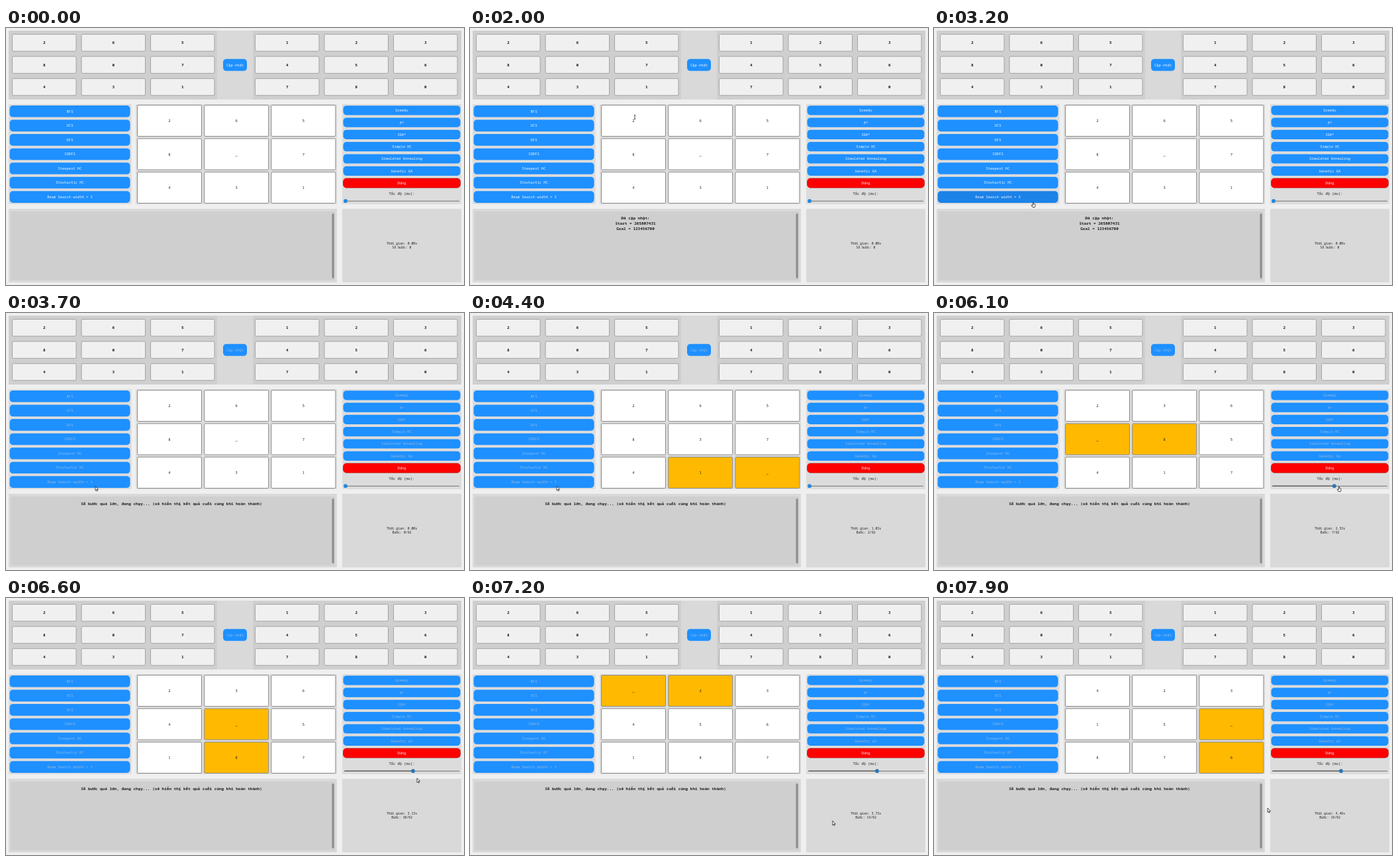
An HTML page with a canvas that plays this animation: 692 by 388 pixels, repeating every 8000 ms.

```html
<!DOCTYPE html>
<html lang="vi">
<head>
<meta charset="utf-8">
<title>8-puzzle</title>
<style>
  html, body { margin: 0; width: 100%; height: 100%; overflow: hidden; background: #efefef; }
  canvas { display: block; }
</style>
</head>
<body>
<canvas id="stage" width="692" height="388"></canvas>
<script>
const ctx = document.getElementById('stage').getContext('2d');
const LOOP = 8000, UPDATED = 1400, RUN = 3500;
const BLUE = '#1e90ff', HOVER = '#1b82e8', AMBER = '#ffb900', INK = '#1c1c1c';

// Search result: each letter moves the blank one cell.
const MOVES = 'DRUULDLDRURULLDDRRU';
const STEP_TIMES = [4100, 4400, 4900, 5200, 5500, 5750, 6000, 6200, 6400, 6600,
  6800, 6900, 7000, 7100, 7300, 7400, 7600, 7700, 7900];
const FIRST_ELAPSED = [0, .52, 1.03, 1.45, 1.75, 2.01, 2.28, 2.53, 2.75, 2.95];
const OFFSET = { U: -3, D: 3, L: -1, R: 1 };

const states = [{ tiles: [...'2658_7431'], lit: [] }];
for (const move of MOVES) {
  const tiles = [...states[states.length - 1].tiles];
  const from = tiles.indexOf('_'), to = from + OFFSET[move];
  [tiles[from], tiles[to]] = [tiles[to], tiles[from]];
  states.push({ tiles, lit: [from, to] });
}

const stepAt = t => STEP_TIMES.filter(at => at <= t).length;
const elapsed = n => n < 10 ? FIRST_ELAPSED[n] : 3.13 + .15 * (n - 10);

// Keys are [time, value, ...]; linear in between.
function track(keys, t) {
  if (t <= keys[0][0]) return keys[0].slice(1);
  const i = keys.findIndex(k => k[0] > t);
  if (i < 0) return keys[keys.length - 1].slice(1);
  const a = keys[i - 1], b = keys[i], f = (t - a[0]) / (b[0] - a[0]);
  return a.slice(1).map((v, j) => v + (b[j + 1] - v) * f);
}
const POINTER = [[900, 602, 152], [1300, 346, 54], [1800, 346, 54], [2000, 249, 134.5],
  [2600, 150, 226], [3000, 150, 259], [3200, 150, 263], [3500, 143, 262], [3800, 131, 261.5],
  [4400, 131, 261.5], [4900, 514, 262], [5100, 514, 262], [5700, 572, 262], [6200, 622, 262],
  [6400, 622, 266], [6600, 621, 272], [6900, 612, 292], [7400, 505, 366], [7800, 505, 366],
  [7900, 504, 317]];
const KNOB = [[5100, 513], [5700, 564], [6200, 615]];

const grid = (x, y, dx, dy, w, h) => Array.from({ length: 9 }, (_, i) =>
  ({ x: x + i % 3 * dx, y: y + Math.floor(i / 3) * dy, w, h }));
const startCells = grid(9.5, 9.5, 104.5, 33.4, 96.5, 25.5);
const goalCells = grid(376.5, 9.5, 104.5, 33.4, 96.5, 25.5);
const boardCells = grid(198.5, 116.5, 101.2, 50.5, 97, 47);
const column = (labels, x, y, w, h, pitch) =>
  labels.map((label, i) => ({ label, x, y: y + i * pitch, w, h }));
const buttons = [
  { label: 'Cập nhật', x: 328, y: 46.8, w: 36, h: 18 },
  ...column(['BFS', 'UCS', 'DFS', 'IDDFS', 'Steepest HC', 'Stochastic HC',
    'Beam Search width = 3'], 5.5, 117, 182, 17.6, 21.55),
  ...column(['Greedy', 'A*', 'IDA*', 'Simple HC', 'Simulated Annealing',
    'Genetic GA', 'Dừng'], 509.5, 117.2, 177, 14.2, 18.3),
];
const slider = { x: 510, y: 258, w: 176, h: 7 };

const inside = (r, [x, y]) => x >= r.x && x <= r.x + r.w && y >= r.y && y <= r.y + r.h;

function box(x, y, w, h, r, fill, stroke, width = 1) {
  ctx.beginPath();
  ctx.roundRect(x, y, w, h, r);
  ctx.fillStyle = fill;
  ctx.fill();
  if (stroke) {
    ctx.strokeStyle = stroke;
    ctx.lineWidth = width;
    ctx.stroke();
  }
}

// Set large and scaled down so that small sizes keep fractional advances.
function text(str, x, y, size, color = INK, weight = 400) {
  ctx.save();
  ctx.translate(x, y);
  ctx.scale(.1, .1);
  ctx.font = `${weight} ${size * 10}px "Noto Sans Mono", "DejaVu Sans Mono", monospace`;
  ctx.textAlign = 'center';
  ctx.textBaseline = 'alphabetic';
  ctx.fillStyle = color;
  ctx.fillText(str, 0, size * 3.5);
  ctx.restore();
}

function panels() {
  ctx.fillStyle = '#efefef';
  ctx.fillRect(0, 0, 692, 388);
  box(4, 4, 684, 104, 1, '#d9d9d9');
  box(4, 4, 315, 104, 1, '#cfcfcf');
  box(373, 4, 315, 104, 1, '#cfcfcf');
  box(4, 115, 185.5, 151, 1, '#dcdcdc');
  box(196, 115, 304, 151, 1, '#dcdcdc');
  box(508, 115, 180, 151, 1, '#dcdcdc');
  box(4, 273, 496, 111, 1, '#d9d9d9');
  box(7, 277, 490, 104, 2, '#cfcfcf');
  box(492.6, 280, 3, 98, 1.5, '#8b8b8b');
  box(508, 273, 180, 111, 1, '#d9d9d9');
}

function inputs(cells, digits) {
  cells.forEach((c, i) => {
    box(c.x, c.y, c.w, c.h, 2, '#f0f0f0', '#a3a3a3');
    text(digits[i], c.x + c.w / 2, c.y + c.h / 2, 6, INK, 700);
  });
}

function board(t) {
  const now = states[stepAt(t)], soon = states[stepAt(t + 50)];
  boardCells.forEach((c, i) => {
    box(c.x, c.y, c.w, c.h, 1.5, now.lit.includes(i) ? AMBER : '#fff', '#8c8c8c');
    // The top row's labels repaint slightly ahead of the rest.
    const label = (i < 3 ? soon : now).tiles[i];
    text(label, c.x + c.w / 2, c.y + c.h / 2 + .3, 5.5);
  });
}

function controls(t, pointer) {
  const running = t >= RUN;
  for (const b of buttons) {
    const stop = b.label === 'Dừng';
    const hot = pointer && inside(b, pointer) && !running;
    const fill = stop ? '#ff0000' : hot ? HOVER : BLUE;
    box(b.x, b.y, b.w, b.h, 4.8, fill, stop && '#a80000', .6);
    text(b.label, b.x + b.w / 2, b.y + b.h / 2, 5.45,
      running && !stop ? '#93b9de' : '#f4f8ff');
  }
  const [knob] = track(KNOB, t);
  text('Tốc độ (ms):', 598, 249.8, 5.45);
  box(511, 260.7, 174, 1.2, .6, '#858585');
  box(511, 260.5, knob - 511, 1.6, .8, '#626262');
  ctx.beginPath();
  ctx.arc(knob, 261.2, 2.9, 0, Math.PI * 2);
  ctx.fillStyle = t > 5100 ? '#2877b8' : '#2588dc';
  ctx.fill();
}

function messages(t) {
  const n = stepAt(t);
  if (t >= RUN) {
    text('Số bước quá lớn, đang chạy... (sẽ hiển thị kết quả cuối cùng khi hoàn thành)',
      250, 287.5, 6, INK, 700);
  } else if (t >= UPDATED) {
    ['Đã cập nhật:', 'Start = 265807431', 'Goal = 123456780'].forEach((line, i) =>
      text(line, 250, 286.4 + i * 8, 6, INK, 700));
  }
  text(`Thời gian: ${elapsed(n).toFixed(2)}s`, 598, 325.6, 4.8);
  text(t >= RUN ? `Bước: ${n}/92` : 'Số bước: 0', 598, 331.7, 4.8);
}

const SHAPES = {
  arrow: new Path2D('M0 0V6.6L1.5 5.2L2.5 7.3L3.4 6.9L2.4 4.8H4.5Z'),
  hand: new Path2D('M-.6 .5Q0 -.3 .6 .5V2.6L3 3.3V5.5L2.3 7.6H-1L-2.9 4.7Q-2.6 3.8 -.6 4.8Z'),
  beam: new Path2D('M-1.2 -2.8H1.2M0 -2.8V2.8M-1.2 2.8H1.2'),
};

function cursor(t, at) {
  const usable = t < RUN && buttons.some(b => inside(b, at));
  const typing = [...startCells, ...goalCells, ...boardCells].some(c => inside(c, at));
  const kind = usable || inside(slider, at) ? 'hand' : typing ? 'beam' : 'arrow';
  ctx.save();
  ctx.translate(...at);
  ctx.fillStyle = '#fff';
  ctx.strokeStyle = '#222';
  ctx.lineWidth = .8;
  if (kind !== 'beam') ctx.fill(SHAPES[kind]);
  ctx.stroke(SHAPES[kind]);
  ctx.restore();
}

function draw(now) {
  const t = now % LOOP;
  const pointer = t >= POINTER[0][0] ? track(POINTER, t) : null;
  panels();
  inputs(startCells, '265807431');
  inputs(goalCells, '123456780');
  board(t);
  controls(t, pointer);
  messages(t);
  if (pointer) cursor(t, pointer);
}

let origin;
function tick(now) {
  origin ??= now;
  draw(now - origin);
  requestAnimationFrame(tick);
}
draw(0);
requestAnimationFrame(tick);
</script>
</body>
</html>
```
